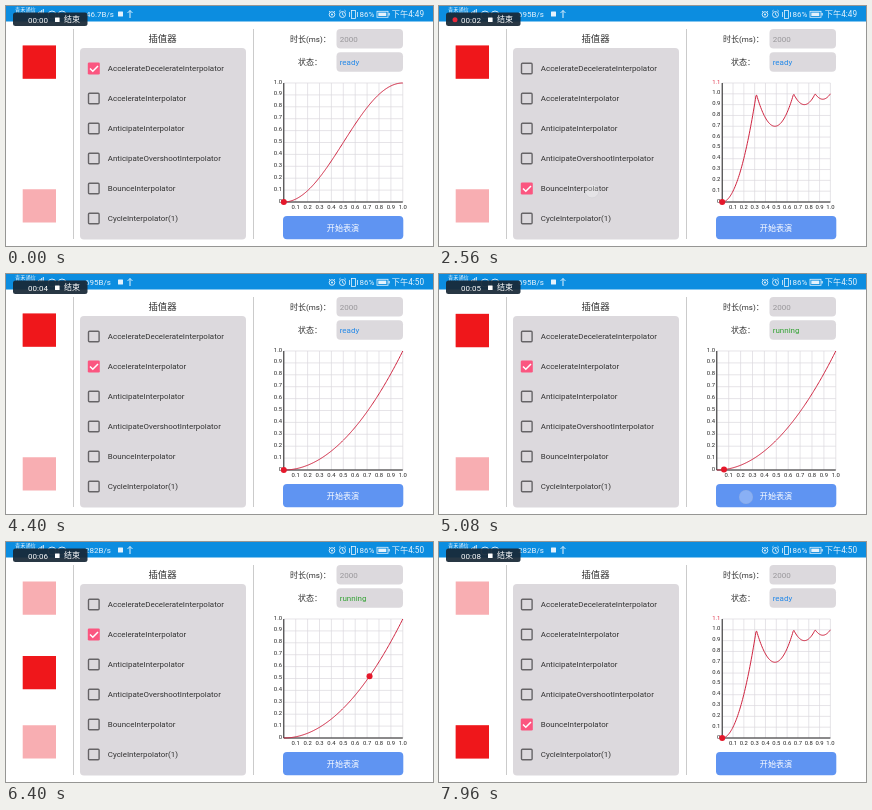
An HTML page with a canvas that plays this animation: 427x240 px, repeating every 8 s.

```html
<!DOCTYPE html>
<html lang="zh">
<head>
<meta charset="utf-8">
<title>插值器</title>
<style>
html, body { margin: 0; width: 100%; height: 100%; overflow: hidden; background: #fff; }
canvas { display: block; width: 427px; height: 240px; }
</style>
</head>
<body>
<canvas id="stage"></canvas>
<script>
const W = 427, H = 240, LOOP = 8000;
const FONT = 'Roboto, "Noto Sans CJK SC", "Noto Sans CJK", sans-serif';
const canvas = document.getElementById('stage');
const ctx = canvas.getContext('2d');
const ratio = window.devicePixelRatio || 1;
canvas.width = W * ratio;
canvas.height = H * ratio;

const anticipate = (t, s) => t * t * ((s + 1) * t - s);
const overshoot = (t, s) => t * t * ((s + 1) * t + s);

function bounce(t) {
  t *= 1.1226;
  if (t < 0.3535) return 8 * t * t;
  if (t < 0.7408) return 8 * (t - 0.54719) ** 2 + 0.7;
  if (t < 0.9644) return 8 * (t - 0.8526) ** 2 + 0.9;
  return 8 * (t - 1.0435) ** 2 + 0.95;
}

// low and high are the chart range in tenths
const options = [
  { name: 'AccelerateDecelerateInterpolator', low: 0, high: 10, f: t => 0.5 - Math.cos(Math.PI * t) / 2 },
  { name: 'AccelerateInterpolator', low: 0, high: 10, f: t => t * t },
  { name: 'AnticipateInterpolator', low: -2, high: 10, f: t => anticipate(t, 2) },
  { name: 'AnticipateOvershootInterpolator', low: -2, high: 12,
    f: t => t < 0.5 ? anticipate(2 * t, 3) / 2 : overshoot(2 * t - 2, 3) / 2 + 1 },
  { name: 'BounceInterpolator', low: 0, high: 11, f: bounce },
  { name: 'CycleInterpolator(1)', low: -10, high: 10, f: t => Math.sin(2 * Math.PI * t) }
];

const FADE = 200;
const RUN_START = 4960, RUN_TIME = 2000;
const taps = [
  { down: 160, up: 360, x: 160, y: 98, pick: 1 },
  { down: 1240, up: 1340, x: 160, y: 128, pick: 2 },
  { down: 1680, up: 1800, x: 166, y: 159, pick: 3 },
  { down: 2320, up: 2440, x: 153, y: 185, pick: 4 },
  { down: 2840, up: 2960, x: 156, y: 217, pick: 5 },
  { down: 3800, up: 3920, x: 162, y: 98, pick: 1 },
  { down: 4820, up: RUN_START, x: 307, y: 223 },
  { down: 7600, up: 7720, x: 155, y: 186, pick: 4 }
];

function rect(x, y, w, h, color, radius = 0) {
  ctx.fillStyle = color;
  ctx.beginPath();
  ctx.roundRect(x, y, w, h, radius);
  ctx.fill();
}

function line(color, width, ...points) {
  ctx.strokeStyle = color;
  ctx.lineWidth = width;
  ctx.beginPath();
  points.forEach(([x, y]) => ctx.lineTo(x, y));
  ctx.stroke();
}

function disc(x, y, r, color) {
  ctx.fillStyle = color;
  ctx.beginPath();
  ctx.arc(x, y, r, 0, 2 * Math.PI);
  ctx.fill();
}

function ring(x, y, r, color, width = 0.9) {
  ctx.strokeStyle = color;
  ctx.lineWidth = width;
  ctx.beginPath();
  ctx.arc(x, y, r, 0, 2 * Math.PI);
  ctx.stroke();
}

function label(text, x, y, size, color, align = 'left') {
  ctx.font = `${size}px ${FONT}`;
  ctx.fillStyle = color;
  ctx.textAlign = align;
  ctx.textBaseline = 'alphabetic';
  ctx.fillText(text, x, y + size * 0.36);
}

function statusBar(ms) {
  const ink = '#e4f2fc';
  rect(0, 0, W, 15.5, '#0c8de0');
  label('青禾通信', 9, 4.5, 5.2, ink);
  for (let i = 0; i < 4; i++) rect(32 + i * 1.6, 6 - i, 1, 2 + i, ink);
  ring(46, 9, 4, ink);
  ring(56, 9, 4, ink);

  const speed = ms < 2400 ? '46.7B/s' : ms < 5400 ? '695B/s' : '282B/s';
  label(speed, ms < 2400 ? 108 : 105, 8, 8, ink, 'right');
  rect(112, 5.5, 5, 5, ink, 0.5);
  line(ink, 1, [124, 4.5], [124, 12]);
  line(ink, 0.9, [121.5, 7], [124, 4.5], [126.5, 7]);

  ring(326, 8.5, 2.8, ink);
  line(ink, 0.8, [323, 5], [324.5, 6.5]);
  line(ink, 0.8, [329, 5], [327.5, 6.5]);
  disc(326, 8.5, 1, ink);
  ring(336.5, 8.5, 3, ink);
  line(ink, 0.8, [336.5, 6.5], [336.5, 8.7], [338, 9.5]);
  line(ink, 0.8, [333, 5.5], [334.5, 4.2]);
  line(ink, 0.8, [340, 5.5], [338.5, 4.2]);
  ctx.strokeRect(345.5, 4.5, 4, 8);
  line(ink, 0.8, [343.5, 6], [343.5, 11]);
  line(ink, 0.8, [351.5, 6], [351.5, 11]);

  label('86%', 353.5, 8.2, 8, ink);
  ctx.strokeStyle = ink;
  ctx.lineWidth = 0.8;
  ctx.strokeRect(371, 5.3, 11, 6);
  rect(372.3, 6.6, 8, 3.4, ink);
  rect(382.5, 7, 1.2, 2.6, ink);
  label(ms < 4040 ? '下午4:49' : '下午4:50', 418, 8.2, 8.2, ink, 'right');
}

function recorder(ms) {
  const seconds = Math.floor((ms + 80) / 1000);
  const phase = ms % 1000;
  rect(7, 6.5, 74.5, 13.5, 'rgba(24,40,54,0.93)', 2.5);
  if (phase > 405 && phase < 900) disc(16, 13.8, 2.5, '#e8283a');
  label(`00:0${seconds}`, 22, 13.7, 8, '#fff');
  rect(49, 11.5, 4.6, 4.6, '#fff', 0.5);
  label('结束', 58, 13.6, 8, '#fff');
}

function optionList(selected) {
  label('插值器', 156.5, 32.7, 9.4, '#333', 'center');
  rect(74, 42, 166, 191.5, '#dcd9dd', 4);
  options.forEach((option, i) => {
    const y = 62.5 + i * 30;
    if (i === selected) {
      rect(81.8, y - 6, 12, 12, '#fb5680', 1.3);
      line('#fff', 1.5, [84, y], [86.8, y + 2.8], [92, y - 2.6]);
    } else {
      ctx.strokeStyle = '#666467';
      ctx.lineWidth = 1.4;
      ctx.beginPath();
      ctx.roundRect(82.5, y - 5.3, 10.6, 10.6, 1);
      ctx.stroke();
    }
    label(option.name, 101.8, y, 7.95, '#333');
  });
}

function chart({ low, high, f }, progress) {
  const top = 77, size = 119;
  const unit = size / (high - low);
  const left = 337.3 - unit * 5, right = left + unit * 10;
  const px = t => left + t * unit * 10;
  const py = v => top + (high - v * 10) * unit;

  for (let i = low; i <= high; i++) line('#dcd8df', 0.7, [left, py(i / 10)], [right, py(i / 10)]);
  for (let i = 0; i <= 10; i++) line('#dcd8df', 0.7, [px(i / 10), top], [px(i / 10), top + size]);
  line('#222', 1, [left, top], [left, top + size]);
  line('#222', 1, [left, py(0)], [right, py(0)]);

  for (let i = low; i <= high; i++) {
    const color = i < 0 || i > 10 ? '#e0324a' : '#222';
    label(i ? (i / 10).toFixed(1) : '0', left - 1.8, py(i / 10) - 1.6, 5.9, color, 'right');
  }
  for (let i = 1; i <= 10; i++) label((i / 10).toFixed(1), px(i / 10), py(0) + 5.2, 5.9, '#222', 'center');

  const curve = Array.from({ length: 161 }, (_, i) => [px(i / 160), py(f(i / 160))]);
  line('#cf2440', 1, ...curve);
  disc(px(progress), py(f(progress)), 3, '#e5182b');
}

function controls(running) {
  label('时长(ms)：', 284, 33, 8, '#333');
  label('状态：', 292, 56.2, 8, '#333');
  rect(330.5, 23, 66.5, 19.5, '#dcd9dd', 4);
  rect(330.5, 46.3, 66.5, 19.5, '#dcd9dd', 4);
  label('2000', 333.7, 33, 8, '#98969a');
  label(running ? 'running' : 'ready', 333.7, 56.3, 8, running ? '#35a336' : '#2489e8');
  rect(277, 210, 120.3, 23.3, '#5f94f2', 4);
  label('开始表演', 337, 222, 8.1, '#fff', 'center');
}

function touches(ms) {
  for (const { down, up, x, y } of taps) {
    if (ms < down || ms >= up + FADE) continue;
    ctx.globalAlpha = ms < up ? 1 : 1 - (ms - up) / FADE;
    disc(x, y, 7, 'rgba(255,255,255,0.68)');
    ring(x, y, 6.8, 'rgba(150,150,160,0.5)', 0.7);
    ctx.globalAlpha = 1;
  }
}

function draw(ms) {
  const picked = taps.filter(tap => tap.pick !== undefined && ms >= tap.up).pop();
  const selected = picked ? picked.pick : 0;
  const run = Math.min(1, Math.max(0, (ms - RUN_START) / RUN_TIME));
  const running = run > 0 && run < 1;
  const reset = picked && picked.up > RUN_START;
  const travel = reset ? 1 : run * run;

  ctx.setTransform(ratio, 0, 0, ratio, 0, 0);
  rect(0, 0, W, H, '#fff');
  line('#cbcbcb', 1, [67.5, 23], [67.5, 233]);
  line('#cbcbcb', 1, [247.5, 23], [247.5, 233]);
  rect(16.7, 39.4, 33.3, 33.3, '#f8aeb2');
  rect(16.7, 183.2, 33.3, 33.3, '#f8aeb2');
  rect(16.7, 39.4 + travel * 143.8, 33.3, 33.3, '#ef171b');
  optionList(selected);
  controls(running);
  chart(options[selected], reset ? 0 : run);
  statusBar(ms);
  recorder(ms);
  touches(ms);
}

const start = performance.now();
function frame() {
  draw((performance.now() - start) % LOOP);
  requestAnimationFrame(frame);
}
frame();
</script>
</body>
</html>
```
